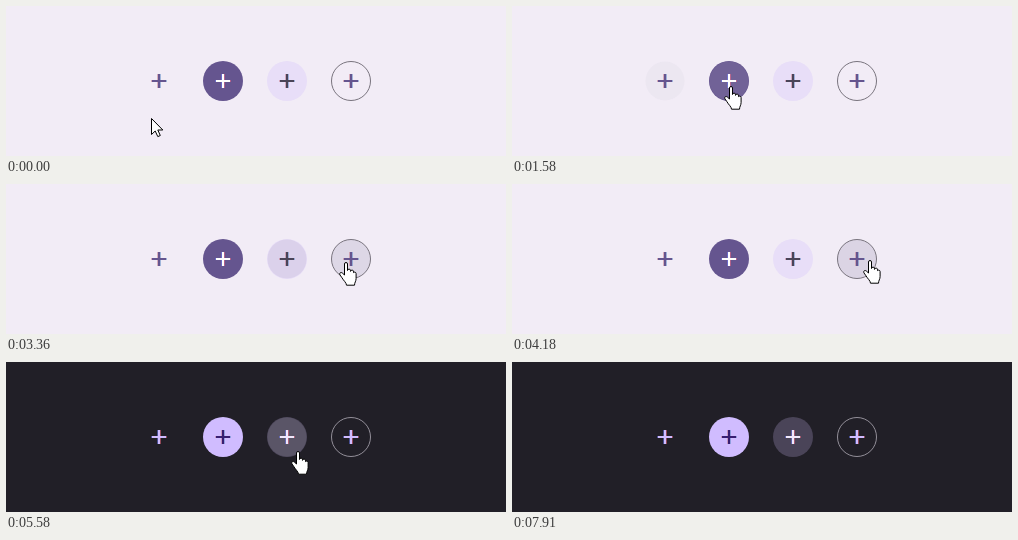
Animation, 500 px wide and 150 px high, one loop 8300 ms. Source, as an HTML page:

```html
<!DOCTYPE html>
<html lang="en">
<head>
<meta charset="utf-8">
<title>Icon buttons</title>
<style>
  html, body { margin: 0; width: 100%; height: 100%; overflow: hidden; background: #f2ecf6; }
  svg { display: block; width: 500px; height: 150px; }
  .light {
    --bg: #f2ecf6; --primary: #65558f; --on-primary: #fff;
    --tonal: #e8def8; --on-tonal: #4a4458; --outline: #79747e;
    --hover-text: #e9e4ef; --hover-filled: #716297; --hover-tonal: #dbd1eb; --hover-outlined: #dbd4e4;
  }
  .dark {
    --bg: #211f27; --primary: #d0bcff; --on-primary: #381e72;
    --tonal: #4a4458; --on-tonal: #f0e8fb; --outline: #938f99;
    --hover-text: #2d2a35; --hover-filled: #c7b2f5; --hover-tonal: #5a5567; --hover-outlined: #34313a;
  }
  .bg { fill: var(--bg); }
  .text, .outlined { --base: none; --ink: var(--primary); }
  .filled { --base: var(--primary); --ink: var(--on-primary); }
  .tonal { --base: var(--tonal); --ink: var(--on-tonal); }
  .outlined .ring { stroke: var(--outline); }
  .base { fill: var(--base); }
  .ring { fill: none; }
  .ink { fill: var(--ink); }
  /* Subpixel fringes swap sides between dark and light ink. */
  .button { --left: #c07080; --right: #5080c0; }
  .light .filled, .dark .button:not(.filled) { --left: #7080ff; --right: #ff7088; }
  .left { fill: var(--left); }
  .right { fill: var(--right); }
  .cursor path { fill: #fff; stroke: #000; stroke-linejoin: round; }
</style>
</head>
<body>
<svg id="stage" class="light" viewBox="0 0 500 150">
  <defs>
    <path id="plus" d="M-7-1H-1V-7H1V-1H7V1H1V7H-1V1H-7Z"/>
  </defs>
  <rect class="bg" width="500" height="150"/>
  <g id="buttons"></g>
  <g id="cursor" class="cursor">
    <path id="arrow" d="M.5.5V16.5L4.2 13 6.8 18.6 9.3 17.5 6.8 12H11.8Z"/>
    <path id="hand" transform="translate(-6 0)" d="M5.5 13V2a1.5 1.5 0 0 1 3 0V8.5a1.5 1.5 0 0 1 3 .3v.6a1.5 1.5 0 0 1 3 .5v.7a1.5 1.5 0 0 1 2.6 1V16.5c0 2.8-1.6 4-1.6 6.7H7.5c0-2.4-3-4.6-4.5-7.4L.9 12.8C0 11 2 9.8 3.3 11Z"/>
  </g>
</svg>
<script>
const LOOP = 8300, DARK_START = 4360;
const LIGHT_PACE = 430, DARK_PACE = 260;
const FADE = 90, HOLD = 280, SAMPLES = 8;
const CENTER_Y = 75, RADIUS = 20;
const $ = id => document.getElementById(id);

const buttons = ['text', 'filled', 'tonal', 'outlined']
  .map((kind, i) => ({ kind, x: 153 + 64 * i }));

const home = { x: 145, y: 112 };
const stops = [
  { at: 270, x: 153, y: 81 },
  { at: 1250, x: 221, y: 80 },
  { at: 2320, x: 286, y: 83 },
  { at: 3160, x: 357, y: 76 },
  { at: 4200, x: 400, y: 170 },
  { at: 4380, x: 345, y: 88 },
  { at: 5150, x: 291, y: 89, dip: 22 },
  { at: 6000, x: 221, y: 82 },
  { at: 6770, x: 158, y: 83 },
  { at: 7490, x: 281, y: 170 }
];

$('buttons').innerHTML = buttons.map(({ kind, x }) => `
  <g class="button ${kind}" transform="translate(${x} ${CENTER_Y})">
    <circle class="base" r="${RADIUS}"/>
    <circle class="hover" r="${RADIUS - .5}" style="fill:var(--hover-${kind})"/>
    <circle class="ring" r="${RADIUS - .5}"/>
    <use class="left" href="#plus" x="-.5"/>
    <use class="right" href="#plus" x=".5"/>
    <use class="ink" href="#plus"/>
  </g>`).join('');
const layers = document.querySelectorAll('.hover');

const mix = (a, b, p) => a + (b - a) * p;
const easeOut = p => 1 - (1 - p) ** 2.2;

function cursorAt(t) {
  let { x, y } = home;
  for (const stop of stops) {
    if (t < stop.at) break;
    const pace = stop.at < DARK_START ? LIGHT_PACE : DARK_PACE;
    const p = easeOut(Math.min(1, (t - stop.at) / pace));
    x = mix(x, stop.x, p);
    y = mix(y, stop.y, p) + (stop.dip || 0) * 4 * p * (1 - p);
  }
  return { x: Math.round(x), y: Math.round(y) };
}

const inside = (button, { x, y }) => Math.hypot(x - button.x, y - CENTER_Y) < RADIUS;
const steps = Array.from({ length: SAMPLES }, (_, i) => i / SAMPLES);

// A button stays lit for HOLD after the cursor leaves; both changes fade over FADE.
const lit = (button, t) => steps.some(s => inside(button, cursorAt(t - s * HOLD)));
const hover = (button, t) => steps.filter(s => lit(button, t - s * FADE)).length / SAMPLES;

function draw(t) {
  $('stage').setAttribute('class', t < DARK_START ? 'light' : 'dark');
  buttons.forEach((button, i) => layers[i].style.opacity = hover(button, t));
  const cursor = cursorAt(t);
  const over = buttons.some(button => inside(button, cursor));
  $('cursor').setAttribute('transform', `translate(${cursor.x} ${cursor.y})`);
  $('hand').style.display = over ? '' : 'none';
  $('arrow').style.display = over ? 'none' : '';
}

const begin = performance.now();
function tick() {
  draw((performance.now() - begin) % LOOP);
  requestAnimationFrame(tick);
}
tick();
</script>
</body>
</html>
```
